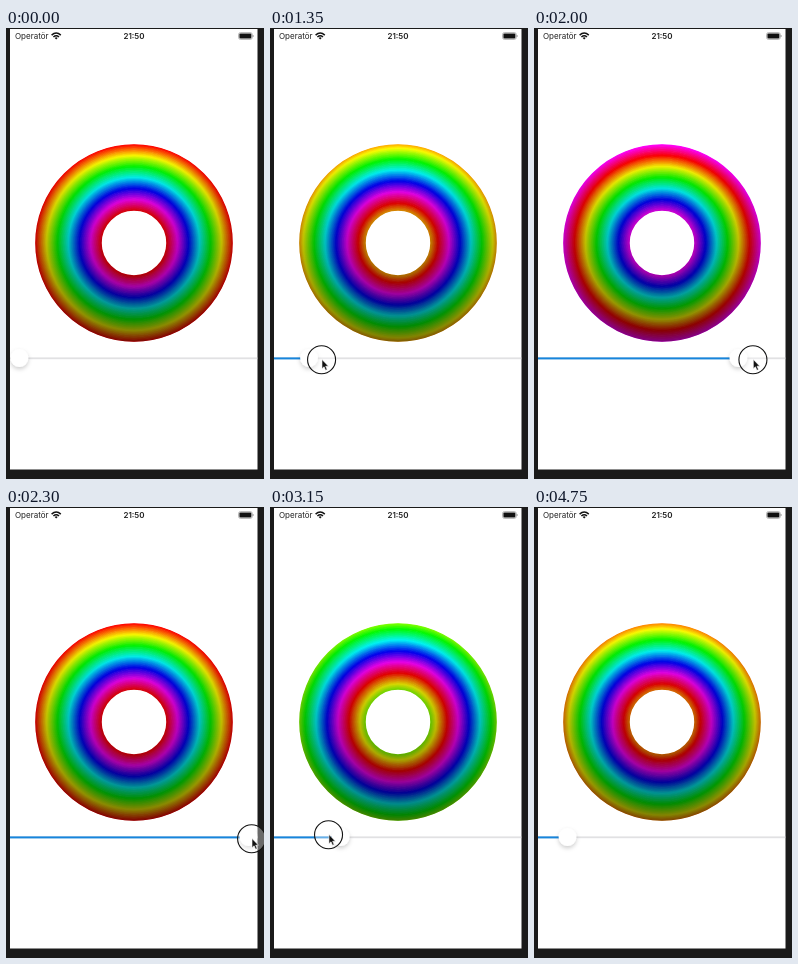
Recreate the animation shown at these times as an HTML page. Size 258 px wide and 451 px high, loop 5.8 s.

```html
<!DOCTYPE html>
<html lang="en">
<head>
<meta charset="utf-8">
<title>Color cycling ring</title>
<style>
  html, body { margin: 0; width: 100%; height: 100%; overflow: hidden; background: #1a1a1a; }
  svg { display: block; width: 258px; height: 451px; }
  text { font-family: Inter, "Liberation Sans", sans-serif; font-size: 8px; fill: #222; }
</style>
</head>
<body>
<svg viewBox="0 0 258 451">
  <defs>
    <filter id="shadow" x="-60%" y="-60%" width="220%" height="220%">
      <feDropShadow dx="0" dy="2.2" stdDeviation="2.2" flood-opacity=".2"/>
    </filter>
    <clipPath id="screen"><rect x="4" y="1" width="247.5" height="440.5"/></clipPath>
    <linearGradient id="shade" gradientUnits="userSpaceOnUse" x1="0" y1="116.2" x2="0" y2="313.8">
      <stop offset="0" stop-opacity="0"/>
      <stop offset="1" stop-opacity=".5"/>
    </linearGradient>
  </defs>
  <rect width="258" height="451" fill="#1a1a1a"/>
  <rect x="4" y="1" width="247.5" height="440.5" fill="#fff"/>

  <text x="9" y="10.9">Operatör</text>
  <text x="128" y="11" text-anchor="middle" font-weight="600">21:50</text>
  <g fill="none" stroke="#111" stroke-width="1.5">
    <path d="M45.6 7.1Q50.2 3 54.8 7.1M47.4 9Q50.2 6.5 53 9"/>
    <path d="M48.7 9.9Q50.2 8.6 51.7 9.9L50.2 11.5Z" fill="#111" stroke="none"/>
  </g>
  <rect x="232.5" y="4.6" width="13.8" height="6.8" rx="2" fill="none" stroke="#999" stroke-width=".7"/>
  <rect x="233.4" y="5.5" width="12" height="5" rx="1.1" fill="#111"/>
  <path d="M247.1 7v2" stroke="#999" stroke-width=".9"/>

  <g id="ring" fill="none"></g>

  <g clip-path="url(#screen)">
    <rect x="4" y="329.4" width="247.5" height="1.8" fill="#e1e1e3"/>
    <rect id="fill" x="4" y="329.4" height="2" fill="#1685dc"/>
    <circle id="thumb" cy="330" r="8.9" fill="#fff" filter="url(#shadow)"/>
  </g>
  <g id="pointer">
    <circle cx="-.4" cy=".2" r="14" fill="#fff" fill-opacity=".35" stroke="#111" stroke-width="1.1"/>
    <path d="M0 0V9.2L2.1 7.3L3.6 10.8L5.2 10.1L3.7 6.7H6.5Z" fill="#111" stroke="#fff" stroke-width=".6"/>
  </g>
</svg>
<script>
const LOOP = 5800, STEPS = 100, POINT = 247 / 375;
const TRACK_START = 13.4, TRACK_END = 242.6;
const GRAB_TIME = 1150, LAG = 40;
const $ = id => document.getElementById(id);

const clamp = (v, lo, hi) => Math.min(hi, Math.max(lo, v));
const ease = (t, from, to) => (1 - Math.cos(Math.PI * clamp((t - from) / (to - from), 0, 1))) / 2;

// Each stroke of the hand: start time, end time, destination x.
const strokes = [
  [600, 850, 16],
  [GRAB_TIME, 1700, 138],
  [1700, 2150, 246],
  [2490, 3410, 17],
  [3410, 3560, 45],
  [3650, 3950, 34.5]
];
const pointerX = t => strokes.reduce((x, [from, to, end]) => x + (end - x) * ease(t, from, to), 30);
const pointerY = t => 331.5 - 4 * ease(t, 2400, 2700);
const pointerOpacity = t => ease(t, 400, 500) - ease(t, 4470, 4600);

function addRing(radius, width, stroke) {
  const circle = document.createElementNS("http://www.w3.org/2000/svg", "circle");
  const attrs = { cx: 128, cy: 215, r: radius * POINT, "stroke-width": width * POINT, stroke };
  for (const key in attrs) circle.setAttribute(key, attrs[key]);
  return $("ring").appendChild(circle);
}

const bands = Array.from({ length: STEPS }, (_, i) => addRing(149 - i, 2, "none"));
addRing(99.5, 101, "url(#shade)");

function render(t) {
  // The thumb trails the pointer slightly once the drag begins.
  const thumbX = t < GRAB_TIME ? TRACK_START
    : clamp(pointerX(t - LAG) - 1, TRACK_START, TRACK_END);
  const amount = (thumbX - TRACK_START) / (TRACK_END - TRACK_START);
  bands.forEach((band, i) => {
    band.setAttribute("stroke", `hsl(${(i / STEPS + amount) % 1 * 360}, 100%, 50%)`);
  });
  $("thumb").setAttribute("cx", thumbX);
  $("fill").setAttribute("width", amount ? thumbX - 4 : 0);
  $("pointer").setAttribute("transform", `translate(${pointerX(t)} ${pointerY(t)})`);
  $("pointer").setAttribute("opacity", pointerOpacity(t));
}

const start = performance.now();
function tick() {
  render((performance.now() - start) % LOOP);
  requestAnimationFrame(tick);
}
tick();
</script>
</body>
</html>
```
